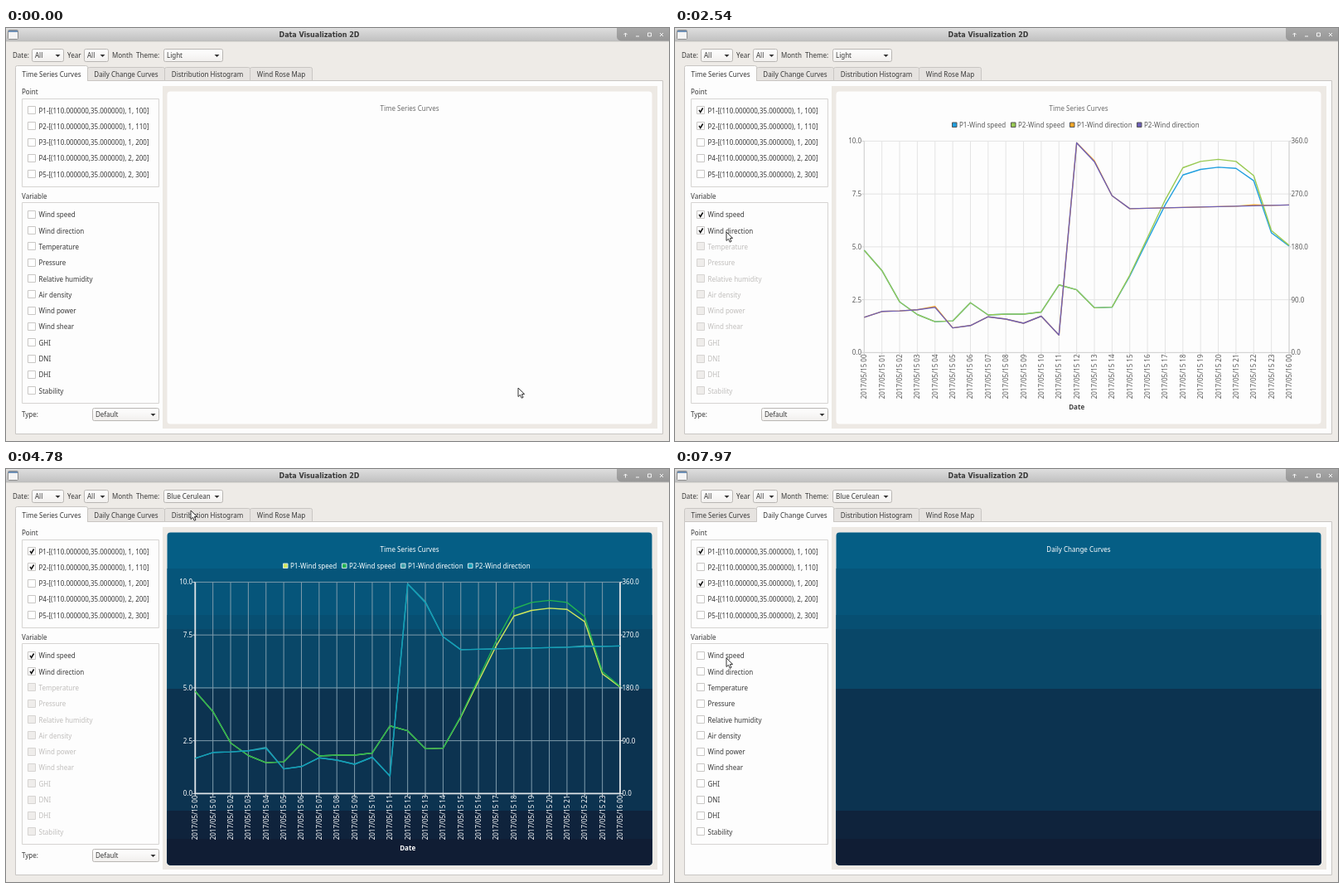
An HTML page with a canvas for the animation above (8 s loop, 800 by 498 pixels).

```html
<!DOCTYPE html>
<html lang="en">
<head>
<meta charset="utf-8">
<title>Data Visualization 2D</title>
<style>
html, body { margin: 0; width: 100%; height: 100%; overflow: hidden; background: #eeebe7; }
canvas { display: block; }
</style>
</head>
<body>
<canvas id="stage" width="800" height="498"></canvas>
<script>
const c = document.getElementById('stage').getContext('2d');
const SANS = '8px "Noto Sans", "Open Sans", sans-serif';
const LOOP = 8000;

const points = ['1, 100', '1, 110', '1, 200', '2, 200', '2, 300']
  .map((s, i) => `P${i + 1}-[(110.000000,35.000000), ${s}]`);
const variables = ['Wind speed', 'Wind direction', 'Temperature', 'Pressure', 'Relative humidity',
  'Air density', 'Wind power', 'Wind shear', 'GHI', 'DNI', 'DHI', 'Stability'];
const themes = ['Light', 'Blue Cerulean', 'Dark', 'Brown Sand', 'Blue NCS', 'High Contrast', 'Blue Icy', 'Qt'];
const tabs = [['Time Series Curves', 86], ['Daily Change Curves', 92],
  ['Distribution Histogram', 102], ['Wind Rose Map', 74]];

// Hourly data: a calm morning, a steady rise to a rounded crest, a quick drop.
const list = (n, rule) => Array.from({ length: n }, (_, i) => rule(i));
const crest = list(7, i => Math.min(3.66 + 1.78 * i, 9.14 - .1 * (i - 5) ** 2));
const speed2 = [4.84, 3.88, 2.4, 1.8, 1.46, 1.5, 2.36, 1.78, 1.82, 1.82, 1.92, 3.2, 2.97, 2.12, 2.15,
  ...crest, 8.37, 5.77, 5.07];
const speed1 = speed2.map((v, i) => v * (1 - .042 * Math.max(0, Math.sin((i - 14) / 10.5 * Math.PI)) * (i > 14)));
const dir2 = [60, 70, 71, 73, 77, 42, 46, 61, 57, 50, 62, 30, 357, 325, 267, ...list(10, i => 245 + .7 * i)];
const dir1 = dir2.map((v, i) => v + (i % 9 === 4 ? 1.6 : 0));
const series = [['P1-Wind speed', speed1, 10], ['P2-Wind speed', speed2, 10],
  ['P1-Wind direction', dir1, 360], ['P2-Wind direction', dir2, 360]];

const looks = [
  { lines: ['#209fdf', '#99ca53', '#f6a625', '#6d5fb8'], grid: '#e4e4e4', axis: '#d2d2d2',
    title: '#6c6c6c', label: '#5a5a5a', date: '#444', axisWidth: 1 },
  { lines: ['#d0e85b', '#22b450', '#3f9fa8', '#0f9fb8'], grid: '#7f9cac', axis: '#dce2e6',
    title: '#fff', label: '#fff', date: '#fff', axisWidth: 1.8 }
];
const bandEdges = [77, 120, 176, 193, 265, 412, 446, 477];

// Pointer moves: start, end, x, y
const moves = [[0, 0, 618, 434], [30, 820, 70, 97], [980, 1300, 66, 115], [1400, 1670, 62, 222],
  [1790, 1900, 62, 246], [2880, 3400, 211, 30], [3740, 4230, 223, 65], [4420, 4620, 223, 50],
  [4970, 5080, 224, 39], [5200, 5420, 76, 50], [5510, 5700, 142, 60], [6060, 6460, 75, 97],
  [6560, 7150, 90, 132], [7300, 7960, 62, 228]];

function pointer(t) {
  let [, , x, y] = moves[0];
  for (const [from, to, nx, ny] of moves.slice(1)) {
    const k = Math.min(1, Math.max(0, (t - from) / (to - from)));
    const e = k * k * (3 - 2 * k);
    x += (nx - x) * e;
    y += (ny - y) * e;
  }
  return [x, y];
}

function text(s, x, y, color = '#383838', align = 'left', font = SANS) {
  c.font = font;
  c.fillStyle = color;
  c.textAlign = align;
  c.fillText(s, x, y + 3);
}

function box(x, y, w, h, fill, stroke, r = 0) {
  c.beginPath();
  c.roundRect(x, y, w, h, r);
  if (fill) { c.fillStyle = fill; c.fill(); }
  if (stroke) { c.strokeStyle = stroke; c.lineWidth = 1; c.stroke(); }
}

function line(pts, color, width = 1) {
  c.beginPath();
  pts.forEach(p => c.lineTo(...p));
  c.strokeStyle = color;
  c.lineWidth = width;
  c.stroke();
}

function shade(y, h, top, bottom) {
  const g = c.createLinearGradient(0, y, 0, y + h);
  g.addColorStop(0, top);
  g.addColorStop(1, bottom);
  return g;
}

function combo(x, y, w, label) {
  box(x + .5, y + .5, w - 1, 15, shade(y, 16, '#fff', '#f1efed'), '#b9b6b3', 2);
  text(label, x + 4, y + 8);
  const ax = x + w - 7.5;
  c.fillStyle = '#333';
  c.beginPath();
  c.moveTo(ax - 3, y + 7);
  c.lineTo(ax + 3, y + 7);
  c.lineTo(ax, y + 10);
  c.fill();
}

function check(label, y, on, off) {
  const top = Math.floor(y - 5) + .5;
  box(26.5, top, 9, 9, off ? '#efedeb' : '#fff', off ? '#d6d4d2' : '#c9c7c5');
  if (on) line([[29, top + 4.4], [30.7, top + 7], [33.6, top + 2]], '#111', 1.5);
  text(label, 39.5, y, off ? '#c0bebc' : undefined);
}

function titleBar() {
  c.fillStyle = shade(0, 16, '#dedede', '#c0c0c0');
  c.fillRect(0, 0, 800, 16);
  line([[0, 16], [800, 16]], '#b4b2b0', .6);
  box(2.5, 2.5, 12, 11, '#f4f4f4', '#8d8d8d', 1);
  c.fillStyle = '#6d8fb5';
  c.fillRect(3, 3, 11, 2);
  text('Data Visualization 2D', 378, 7.5, '#383838', 'center', 'bold 8px "DejaVu Sans", sans-serif');
  box(737, -6, 70, 21.5, shade(0, 16, '#a8a8a8', '#969696'), null, 5);
  const w = '#f4f4f4';
  line([[747.5, 10.5], [747.5, 6]], w);
  line([[745.5, 8], [747.5, 6], [749.5, 8]], w);
  line([[760, 10], [764, 10]], w);
  box(774.5, 6, 4, 4, null, w);
  line([[789, 6], [793, 10]], w);
  line([[793, 6], [789, 10]], w);
}

function tabBar(active) {
  box(11.5, 63.5, 781, 426, '#fdfdfd', '#c9c6c3');
  let x = 12;
  tabs.forEach(([name, w], i) => {
    const on = i === active, top = on ? 45.5 : 47.5;
    box(x - .5, top, w + 1, 63.5 - top, on ? '#fdfdfd' : '#e6e3e0', '#c9c6c3', [2, 2, 0, 0]);
    if (on) {
      c.fillStyle = '#fdfdfd';
      c.fillRect(x, 60, w, 5);
    }
    text(name, x + w / 2, 55.5, undefined, 'center');
    x += w + 1;
  });
}

function plot(count, look) {
  const left = 228.3, right = count > 2 ? 741 : 760.3, top = 136.4, bottom = 391.4;
  const px = i => left + (right - left) * i / 24;
  const py = v => bottom - (bottom - top) * v;

  for (let i = 0; i < 25; i++) {
    const x = px(i);
    line([[x, top], [x, bottom]], look.grid);
    line([[x, bottom], [x, bottom + 3]], look.axis);
    c.save();
    c.translate(x, 393.5);
    c.rotate(-Math.PI / 2);
    const hour = String(i % 24).padStart(2, '0');
    text(`2017/05/${i < 24 ? 15 : 16} ${hour}`, 0, 0, look.label, 'right');
    c.restore();
  }
  for (let i = 0; i < 5; i++) {
    const y = py(i / 4);
    line([[left, y], [right, y]], look.grid);
    line([[left - 3, y], [left, y]], look.axis);
    text((i * 2.5).toFixed(1), 225, y, look.label, 'right');
    if (count > 2) {
      line([[right, y], [right + 3, y]], look.axis);
      text((i * 90).toFixed(1), 743.5, y, look.label);
    }
  }
  line([[left, top], [left, bottom], [right, bottom]], look.axis, look.axisWidth);
  if (count > 2) line([[right, top], [right, bottom]], look.axis, look.axisWidth);
  text('Date', (left + right) / 2, 456.5, look.date, 'center', 'bold ' + SANS);

  c.lineJoin = 'round';
  let x = count > 2 ? 334 : 413;
  series.slice(0, count).forEach(([name, data, max], i) => {
    line(data.map((v, k) => [px(k), py(v / max)]), look.lines[i], 1.4);
    box(x + .5, 114, 5.5, 5.5, look.lines[i], look === looks[0] ? '#555' : '#cfe3ea');
    text(name, x + 9, 117, look.label);
    x += i < 2 ? 71 : 81;
  });
  c.lineJoin = 'miter';
}

// Stepped blend from blue to navy; each band takes the colour at its middle.
function blueBands() {
  const from = [4, 98, 138], to = [16, 26, 49];
  bandEdges.slice(0, -1).forEach((y, i) => {
    const k = ((y + bandEdges[i + 1]) / 2 - 77) / 400;
    c.fillStyle = `rgb(${from.map((v, n) => Math.round(v + (to[n] - v) * k))})`;
    c.fillRect(194, i ? y : 76, 586, 478 - y);
  });
}

function chart(title, count, blue) {
  c.fillStyle = '#ede9e4';
  c.fillRect(189, 70, 597, 413);
  const look = looks[+blue];
  c.save();
  box(194.5, 76.5, 585, 401, '#fdfdfd', null, 4);
  if (blue) {
    c.clip();
    blueBands();
  }
  c.restore();
  text(title, 487, 96.5, look.title, 'center');
  if (count) plot(count, look);
}

function menu(y) {
  const step = 16.6, hot = Math.floor((y - 25.5) / step);
  box(190.5, 25.5, 72, 133, '#ede9e4', '#a5a29f');
  themes.forEach((name, i) => {
    const top = 25.5 + i * step;
    if (i === hot) box(191, top, 71, step, '#308cc6', '#2a7ab0');
    text(name, 195, top + 8.5, i === hot ? '#fff' : undefined);
  });
}

function arrow(x, y) {
  c.beginPath();
  [[0, 0], [0, 10.5], [2.5, 8.3], [4.2, 12.2], [6, 11.4], [4.4, 7.6], [7.6, 7.4]]
    .forEach(([dx, dy]) => c.lineTo(x + dx, y + dy));
  c.closePath();
  c.fillStyle = '#fff';
  c.fill();
  c.strokeStyle = '#333';
  c.lineWidth = 1;
  c.stroke();
}

function draw(t) {
  const [mx, my] = pointer(t);
  const daily = t >= 5780, blue = t >= 4780;
  const checked = daily
    ? [t >= 6500, false, t >= 7220]
    : [t >= 890, t >= 1360];
  const picked = daily ? [] : [t >= 1760, t >= 2140];

  c.fillStyle = '#eeebe7';
  c.fillRect(0, 0, 800, 498);
  titleBar();

  text('Date:', 8, 33);
  combo(31, 25, 39, 'All');
  text('Year', 74, 33);
  combo(94, 25, 30, 'All');
  text('Month', 128, 33);
  text('Theme:', 157, 33);
  combo(190, 25, 72, themes[+blue]);

  tabBar(+daily);
  text('Point', 19, 77);
  box(19.5, 85.5, 165, 106, '#fdfdfd', '#d6d4d2');
  points.forEach((p, i) => check(p, 99.5 + i * 19.3, checked[i]));
  text('Variable', 19, 202.5);
  box(19.5, 210.5, 165, 242, '#fdfdfd', '#d6d4d2');
  variables.forEach((v, i) => check(v, 225.3 + i * 19.3, picked[i], picked[1] && i > 1));
  if (!daily) {
    text('Type:', 19, 465.5);
    combo(104, 458, 81, 'Default');
  }

  const count = daily || t < 1760 ? 0 : t < 2540 ? 2 : 4;
  chart(tabs[+daily][0], count, blue);
  if (t >= 3460 && !blue) menu(my);
  arrow(mx, my);
}

const start = performance.now();
function tick() {
  draw((performance.now() - start) % LOOP);
  requestAnimationFrame(tick);
}
tick();
</script>
</body>
</html>
```
